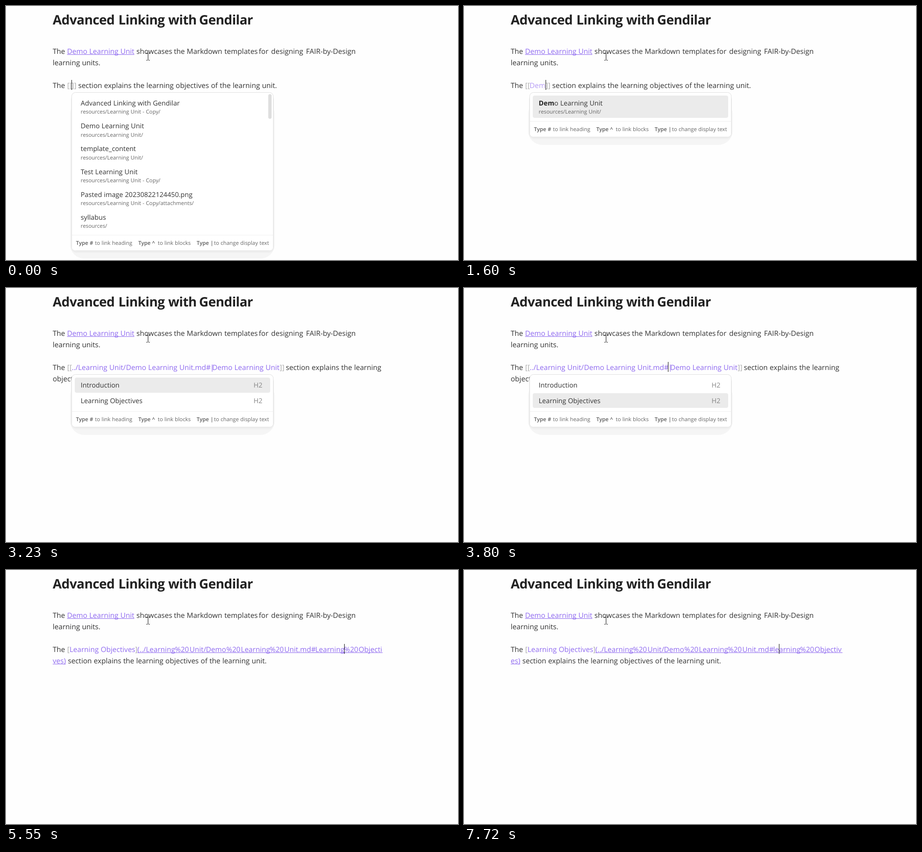
An HTML page for the animation above (8 s loop, 953 by 536 pixels).

```html
<!DOCTYPE html>
<html lang="en">
<head>
<meta charset="utf-8">
<title>Linking notes</title>
<style>
  html, body { margin: 0; width: 100%; height: 100%; overflow: hidden; background: #fefefe; }
  svg { display: block; width: 953px; height: 536px; }
  text {
    font: 15.1px "Open Sans", "Noto Sans", sans-serif; word-spacing: .3px;
    text-rendering: geometricPrecision; white-space: pre; fill: #333;
  }
  .h1 { font-size: 27.5px; font-weight: 700; letter-spacing: -.5px; fill: #222; }
  .link { fill: #8f6af0; }
  .new { fill: #b49af5; }
  .mark { fill: #ababab; }
  .item { font-size: 14.2px; }
  .path { font-size: 11.35px; fill: #666; }
  .key { font-size: 11.3px; font-weight: 600; fill: #5c5c5c; }
  .tag { font-size: 14.2px; fill: #858585; }
  .bold { font-weight: 700; fill: #222; }
</style>
</head>
<body>
<svg viewBox="0 0 953 536">
  <g id="page"></g>
  <g id="scene"></g>
  <path d="M296 99.5h2.5M300.5 99.5h2.5M296 114.5h2.5M300.5 114.5h2.5M299.5 100v14" stroke="#111" fill="none"/>
</svg>
<script>
const LOOP = 8000;
const APP = "Gendilar";
const BASE = 173, NEXT = 197;

const rect = (x, y, w, h, fill, r = 0, more = "") =>
  `<rect x="${x}" y="${y}" width="${w}" height="${h}" rx="${r}" fill="${fill}" ${more}/>`;

// Asterisks switch bold on and off.
const text = (x, y, s, cls = "") =>
  `<text x="${x}" y="${y}" class="${cls}">` +
  s.split("*").map((p, i) => i % 2 ? `<tspan class="bold">${p}</tspan>` : p).join("") + "</text>";

const words = (y, cls, ...runs) => runs.map(([x, s]) => text(x, y, s, cls)).join("");
const underline = (x, y, end) => rect(x, y + 1, end - x, 1, "#8f6af0");

const TAIL = "section explains the learning objectives of the learning unit.";
const the = text(98.5, BASE, "The");

function typing(s, end) {
  return the + text(129, BASE, "[[", "mark") + text(138.3, BASE, s, "new") +
    text(end + .6, BASE, "]]", "mark") + text(end + 14.2, BASE, TAIL);
}

const wiki = the +
  words(BASE, "mark", [129, "[["], [577, "]]"]) +
  words(BASE, "link", [138.5, "../"], [152, "Learning Unit/"], [253, "Demo Learning Unit"],
    [394.5, ".md#"], [430.5, "|"], [434.7, "Demo Learning Unit"]) +
  text(590, BASE, "section explains the learning") +
  text(98.5, NEXT, "objectives of the learning unit.");

function markdown(head, headEnd, last, lastX, end, wrap, wrapEnd) {
  return the +
    words(BASE, "mark", [129, "["], [272.3, "]"]) +
    words(BASE, "link", [134, "Learning Objectives"], [277, "("], [281.5, "../"],
      [295, "Learning"], [356, "%20"], [387, "Unit/"], [421.5, "Demo"], [464.5, "%20"],
      [495.3, "Learning"], [556, "%20"], [586.7, "Unit"], [616, ".md#"],
      [652, head], [headEnd, "%20"], [lastX, last]) +
    text(98.5, NEXT, wrap, "link") +
    underline(277, BASE, end) + underline(98.5, NEXT, wrapEnd) +
    text(wrapEnd + 4.5, NEXT, TAIL);
}
const upper = markdown("Learning", 713, "Objecti", 743.5, 794, "ves)", 126);
const lower = markdown("learning", 708.5, "Objectiv", 739, 798, "es)", 118.5);
const selected = rect(652, 155, 8, 24, "#dcd2fa") + upper;

function popup(bottom, body) {
  return rect(135, 198, 431.5, bottom + 17 - 198, "#f5f5f5", 30) +
    rect(137, 186, 428, bottom + 5 - 186, "#efefef", 12) +
    rect(138.5, 182.5, 425, bottom - 182, "#fff", 8, 'stroke="#e0e0e0"') +
    body +
    rect(139, bottom - 33, 424, 33, "#fff", 7) +
    rect(139, bottom - 33, 424, 1, "#f0f0f0") +
    words(bottom - 12, "key", [147.5, "Type #"], [279, "Type ^"], [402, "Type |"]) +
    words(bottom - 12, "path", [187.5, "to link heading"], [320, "to link blocks"],
      [438.5, "to change display text"]);
}
const glow = (y, w, h) => rect(145, y, w, h, "#ebebeb", 4);
const bar = h => rect(553, 186, 7, h, "#dedede", 3.5);

// A row with a path is 48.2 high, one without 32.6.
function list(rows) {
  let y = 210;
  return rows.map(([name, path]) => {
    const row = text(157.5, y, name, "item") + (path ? text(157.5, y + 17.3, path, "path") : "");
    y += path ? 48.2 : 32.6;
    return row;
  }).join("");
}

const UNIT = "resources/Learning Unit/", COPY = "resources/Learning Unit - Copy/";
const recent = popup(516, bar(52) + list([
  ["Advanced Linking with " + APP, COPY],
  ["Demo Learning Unit", UNIT],
  ["template_content", UNIT],
  ["Test Learning Unit", COPY],
  ["Pasted image 20230822124450.png", COPY + "attachments/"],
  ["syllabus", "resources/"]
]));
const matches = popup(516, glow(189, 400, 47) + bar(104) + list([
  ["*D*emo Learning Unit", UNIT],
  ["activity_*d*etails_template", UNIT + "Activities/"],
  ["../Activities/activity_*d*etails_template"],
  ["in*d*ex", "resources/"],
  ["mk*d*ocs.yml"],
  ["CO*D*E_OF_CONDUCT"],
  ["REA*D*ME"],
  ["A*d*vanced Linking with " + APP]
]));
const single = name => popup(276, glow(189, 412, 47) + list([[name, UNIT]]));
const headings = pick => popup(293,
  glow(pick ? 222 : 189, 412, pick ? 31 : 32) +
  list([["Introduction"], ["Learning Objectives"]]) +
  words(210, "tag", [522, "H2"]) + words(242.6, "tag", [522, "H2"]));

const caret = (x, y = 156) => rect(x, y, 1, 21, "#111");

// start time, paragraph, popup, caret
const steps = [
  [0, typing("", 138), recent, caret(138)],
  [290, typing("D", 149.5), matches, caret(150)],
  [720, typing("D", 149.5), matches, ""],
  [1320, typing("De", 158), matches, caret(158)],
  [1470, typing("Dem", 171.8), matches, caret(172)],
  [1595, typing("Dem", 171.8), single("*Dem*o Learning Unit"), caret(172)],
  [1720, typing("Demo", 181), single("*Demo* Learning Unit"), caret(181)],
  [2180, typing("Demo", 181), single("*Demo* Learning Unit"), ""],
  [2760, wiki, headings(0), caret(430)],
  [3230, wiki, headings(0), ""],
  [3530, wiki, headings(1), ""],
  [3800, wiki, headings(1), caret(430)],
  [4250, upper, "", caret(126, 180)],
  [4710, upper, "", ""],
  [5120, upper, "", caret(106, 180)],
  [5250, upper, "", caret(777)],
  [5400, upper, "", caret(735)],
  [5550, upper, "", caret(713)],
  [6160, upper, "", caret(695)],
  [6290, upper, "", caret(676)],
  [6420, upper, "", caret(659)],
  [6850, upper, "", caret(652)],
  [7000, selected, "", caret(659)],
  [7440, lower, "", caret(656)],
  [7720, lower, "", caret(664)]
];

document.getElementById("page").innerHTML =
  words(39, "h1", [98.5, "Advanced"], [237, "Linking"], [342, "with"], [407, APP]) +
  text(98.5, 101, "The") +
  text(128.7, 101, "Demo Learning Unit", "link") + underline(128.7, 101, 270.5) +
  words(101, "", [275, "showcases"], [354, "the"], [381, "Markdown"], [460.5, "templates"],
    [533, "for"], [559, "designing"], [632.5, "FAIR-by-Design"]) +
  text(98.5, 125, "learning units.");

const scene = document.getElementById("scene");
const start = performance.now();
let shown = null;

function draw() {
  const t = (performance.now() - start) % LOOP;
  const step = steps.findLast(s => s[0] <= t) || steps[0];
  if (step !== shown) {
    scene.innerHTML = step.slice(1).join("");
    shown = step;
  }
  requestAnimationFrame(draw);
}
draw();
</script>
</body>
</html>
```
